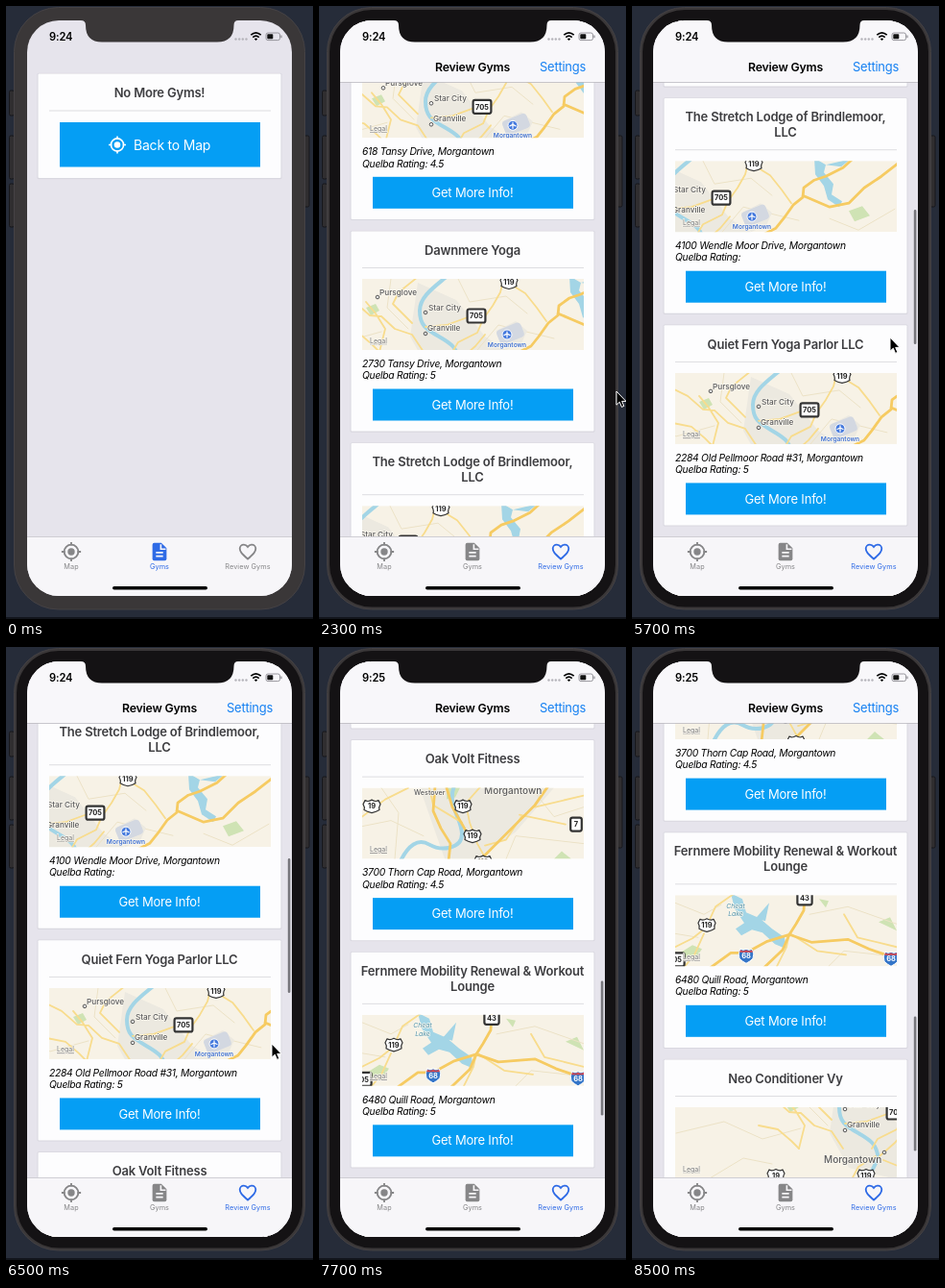
These frames come from a looping animation (320x638 px, 8.6 s). An HTML page:

```html
<!DOCTYPE html>
<html lang="en">
<head>
<meta charset="utf-8">
<title>Gym review</title>
<style>
  html, body { margin: 0; width: 100%; height: 100%; overflow: hidden; background: #262c39; }
  svg { display: block; }
  text { font-family: Inter, Roboto, sans-serif; letter-spacing: -.015em; }
  .map text { letter-spacing: 0; paint-order: stroke; stroke: #fbf8ef; stroke-width: 1.4px; stroke-linejoin: round; }
  .map .sign text { stroke: none; }
  .map path { fill: none; stroke-linecap: round; stroke-linejoin: round; }
  .lane { stroke: #ece2c6; stroke-width: 1; }
  .road { stroke: #f8dc8d; stroke-width: 1.8; }
  .main { stroke: #f6cb62; stroke-width: 2.8; }
  .river { stroke: #a3d5e6; stroke-width: 4; }
  .map .lake { fill: #a3d5e6; }
  .map .park { fill: #cfe3b4; }
  .map .town { fill: #ece9e0; }
  .address { font-style: italic; letter-spacing: -.027em; }
</style>
</head>
<body>
<svg id="stage" width="320" height="638" viewBox="0 0 320 638"></svg>
<script>
{
const LOOP = 8600, STEP = 100;
const WAKE = 1300, OPEN_REVIEWS = 2000, NEXT_MINUTE = 7500;
const BLUE = '#059ef4', ACTIVE = '#2f6be6', IDLE = '#868688';

const rect = (x, y, w, h, fill, more = '') =>
  `<rect x="${x}" y="${y}" width="${w}" height="${h}" fill="${fill}" ${more}/>`;
const text = (x, mid, size, str, fill = '#000', more = '') =>
  `<text x="${x}" y="${mid + size * .36}" font-size="${size}" fill="${fill}" ${more}>${str}</text>`;
const centered = (x, mid, size, str, fill, more = '') =>
  text(x, mid, size, str, fill, `text-anchor="middle" ${more}`);
const path = (cls, d) => `<path class="${cls}" d="${d}"/>`;
const bold = 'font-weight="600"';

// Icons on a 24 unit grid
const icons = {
  target: c => `<g fill="none" stroke="${c}" stroke-width="2"><circle cx="12" cy="12" r="8"/>
    <path d="M12 1v4M12 19v4M1 12h4M19 12h4"/></g><circle cx="12" cy="12" r="4" fill="${c}"/>`,
  page: c => `<path d="M14 2H6a2 2 0 0 0-2 2v16a2 2 0 0 0 2 2h12a2 2 0 0 0 2-2V8z" fill="${c}"/>
    <path d="M13.5 3.5V9H19M8 13h8M8 17h8" fill="none" stroke="#f7f6f9" stroke-width="1.8"/>`,
  heart: c => `<path d="M12 20.2C5.4 14.3 3 12 3 8.6 3 6 5 4 7.5 4c1.8 0 3.4.9 4.5 2.4C13.1 4.9 14.7 4 16.5 4
    19 4 21 6 21 8.6c0 3.4-2.4 5.7-9 11.6z" fill="none" stroke="${c}" stroke-width="2"/>`
};
const icon = (name, cx, cy, scale, color) =>
  `<g transform="translate(${cx - 12 * scale} ${cy - 12 * scale}) scale(${scale})">${icons[name](color)}</g>`;

// Road signs
const sign = (x, y, shape, label, fill = '#222') =>
  `<g class="sign" transform="translate(${x} ${y})">${shape}${centered(0, 0, 7.5, label, fill, 'font-weight="700"')}</g>`;
const route = (x, y, n) => sign(x, y,
  `<path d="M-7-6Q-4-4 0-6.5Q4-4 7-6L9-2Q7 1 8 4Q5 6 0 7Q-5 6-8 4Q-7 1-9-2Z" style="fill:#fff" stroke="#333" stroke-width="1.2"/>`, n);
const boxed = (x, y, n) => {
  const w = 8 + n.length * 3.6;
  return sign(x, y, rect(-w / 2, -7, w, 14, '#fff', 'rx="2" stroke="#333" stroke-width="2.2"'), n);
};
const interstate = (x, y, n) => sign(x, y,
  `<path d="M-6-7Q-3-5 0-7Q3-5 6-7Q9-2 7 3Q4 6 0 8Q-4 6-7 3Q-9-2-6-7Z" style="fill:#3475c8" stroke="#fff"/>
   <path d="M-6-6Q-3-4 0-6Q3-4 6-6L7-3.5H-7Z" style="fill:#d5484f"/>`, n, '#fff');
const place = (x, y, name, size = 8.2) => text(x, y, size, name, '#5a5a5c', 'font-weight="500"');
const dot = (x, y) => `<circle cx="${x}" cy="${y}" r="1.8" fill="#fff" stroke="#555"/>`;

const region = [
  path('town', 'M58 4L98 22L128 60L150 74L120 108L70 96L50 60Z'),
  path('park', 'M4 30l10 -4l4 7l-9 5zM252 52l14 -5l8 10l-16 6z'),
  path('lane', 'M-110 60L-60 48L-20 66L20 55M-80 110L-40 86L-10 92M100 0L112 24L150 18L172 36M120 74L142 48L200 62M232 60L262 72L300 50M30 0L26 30L48 52'),
  path('river', 'M90 -4C76 8 60 18 60 33S66 52 80 60S98 72 100 82S88 100 94 112'),
  path('lake', 'M216 -3L228 4L226 12L236 24L234 35L245 42L242 48L230 40L226 26L217 14ZM228 4L254 -2L244 6Z'),
  path('road', 'M-24 16L-8 24L8 38L20 39L34 52L52 58L64 76M18 76L24 52L14 36L4 24M148 -2L144 14L136 28L126 42L120 56L100 66L94 76M152 4L170 15L182 30L192 44M58 -2L38 14L32 26L44 38L52 46M110 40L88 48L66 50'),
  path('road', 'M-24 52L-4 56L10 68L18 76M98 84L80 95L72 110M102 84L118 70L128 58M106 88L126 96L140 108'),
  path('main', 'M160 78L176 70L184 60L194 46L204 38L205 28L216 20L228 16L246 7L256 -2M204 36L218 42L232 48L252 44L268 28L286 16L304 2'),
  path('town', 'M140 54L160 44L172 54L166 67L150 74Z'),
  rect(141, 49, 27, 16, '#d3d8e1', 'rx="4" transform="rotate(-22 154 57)"'),
  dot(16, 19), place(18, 14, 'Pursglove'),
  dot(66, 35), place(69, 30, 'Star City'),
  dot(66, 57), place(68, 51, 'Granville'),
  `<circle cx="151" cy="58" r="5" fill="#4479dd" stroke="#fff"/>
   <path d="M151 55v6M148 58.6l3-1.6l3 1.6" stroke="#fff" stroke-width="1.2"/>`,
  centered(151, 68.5, 6.6, 'Morgantown', '#3f70d2', bold),
  boxed(119, 38.5, '705'), route(153, 3.5, '119'),
  place(44, 87, 'Morgantown', 10), dot(107, 80), route(-6, 104, '19'), route(88, 104, '119')
].join('');

const south = [
  path('town', 'M60 0H200L160 46L120 74H86Z'),
  path('park', 'M88 0h14l-5 10l-9 2zM200 74l8-8l10 8z'),
  path('lane', 'M0 40L30 34L64 50M150 74L160 50L231 58M176 0L200 30L231 20M20 0L38 26L34 74'),
  path('river', 'M96 -2C88 18 104 32 104 48S82 66 70 59S48 60 40 76'),
  path('road', 'M0 30L24 12L48 0M70 0L74 18L104 36M124 -2L108 16L112 36L120 58L130 76M128 60L150 54L166 30M180 20L231 8M164 28L212 38'),
  path('main', 'M76 -2L74 24L82 42L92 58L90 76M88 0L94 20L110 48M122 76L144 54L166 32L180 18L194 -2'),
  place(54, 5, 'Westover', 7.2), place(127, 3, 'Morgantown', 10),
  route(10, 19, '19'), route(105, 19, '119'), route(115, 50, '119'), route(126, 77, '119'), boxed(223, 38, '7')
].join('');

const lakeside = [
  path('park', 'M2 62l16-10l10 4l-8 12zM150 4l10 2l-3 7zM212 28l12-5l7 14z'),
  path('lane', 'M0 8L30 20L48 10M140 20L180 12L231 30M160 74L176 58L231 64M0 40L24 44'),
  path('lake', 'M58 -2L70 4L74 18L88 24L101 35L114 44L116 56L104 51L91 39L80 36L69 42L63 35L72 29L62 14ZM84 24L98 8L94 27Z'),
  path('road', 'M0 54L18 45L32 34L42 12L62 -2M30 40L20 62L10 74M120 40L148 58L178 62M106 74L116 54L119 40M176 20L190 44L231 54'),
  path('main', 'M36 76L58 60L74 60L96 48L119 41L142 49L180 46L202 56L231 66M135 0L134 16L126 30L119 41L112 57L92 76'),
  centered(63, 11, 6.8, 'Cheat', '#4f91aa', 'font-style="italic"'),
  centered(63, 19.5, 6.8, 'Lake', '#4f91aa', 'font-style="italic"'),
  route(33, 31, '119'), boxed(135, 3, '43'), boxed(2, 67, '05'),
  interstate(74, 63, '68'), interstate(225, 66, '68')
].join('');

const map = (y, art, dx = 0, dy = 0) => `<svg class="map" x="45" y="${y}" width="231" height="74">
  ${rect(0, 0, 231, 74, '#f7f2e6')}<g transform="translate(${dx} ${dy})">${art}</g>
  ${text(8, 64, 7, 'Legal', '#77777a', 'text-decoration="underline"')}</svg>`;

const cardBox = (y, h) =>
  rect(32.5, y - .3, 255, h + 1, '#d9d8e0', 'rx="1.5"') + rect(33.5, y + .4, 253, h - .8, '#fdfdfe', 'rx="1"');
const divider = y => rect(45, y, 231, 1, '#dedee1');

const gyms = [
  { title: [''], address: '618 Tansy Drive', rating: '4.5', art: [region, 6, 3] },
  { title: ['Dawnmere Yoga'], address: '2730 Tansy Drive', rating: '5', art: [region] },
  { title: ['The Stretch Lodge of Brindlemoor,', 'LLC'], address: '4100 Wendle Moor Drive', rating: '', art: [region, -71, 0] },
  { title: ['Quiet Fern Yoga Parlor LLC'], address: '2284 Old Pellmoor Road #31', rating: '5', art: [region, 21, 0] },
  { title: ['Oak Volt Fitness'], address: '3700 Thorn Cap Road', rating: '4.5', art: [south] },
  { title: ['Fernmere Mobility Renewal &amp; Workout', 'Lounge'], address: '6480 Quill Road', rating: '5', art: [lakeside] },
  { title: ['Neo Conditioner Vy'], address: '5150 Larch Road', rating: '5', art: [region, 111, -33] }
];

let nextY = 92.3;
const cards = gyms.map(({ title, address, rating, art }) => {
  const y = nextY, body = y + (title.length - 1) * 15.5;
  nextY = body + 220.7;
  return cardBox(y, body - y + 209)
    + title.map((line, i) => centered(160, y + 20 + i * 16, 13, line, '#3d3d40', bold)).join('')
    + divider(body + 38) + map(body + 50, ...art)
    + text(45, body + 138, 10.3, `${address}, Morgantown`, '#000', 'class="address"')
    + text(45, body + 150.5, 10.3, `Quelba Rating: ${rating}`, '#000', 'class="address"')
    + rect(56, body + 164.5, 209, 33, BLUE)
    + centered(160, body + 181, 13, 'Get More Info!', '#fff');
}).join('');

const emptyScreen = rect(22, 15, 276, 600, '#e6e4ec') + cardBox(70, 109.5)
  + centered(160, 90, 13, 'No More Gyms!', '#3d3d40', bold) + divider(108.5)
  + rect(56, 121, 209, 46.5, BLUE) + icon('target', 116, 144.5, .82, '#fff')
  + text(133, 144.5, 14, 'Back to Map', '#fff');

const reviewScreen = rect(22, 15, 276, 600, '#e6e4ec') + `<g id="list">${cards}</g>`
  + rect(293.8, 0, 2.6, 140, '#77767c', 'id="bar" rx="1.3"')
  + rect(22, 15, 276, 64, '#f8f7fa') + rect(22, 79, 276, .8, '#bcbbc1')
  + centered(160, 63.5, 12.3, 'Review Gyms', '#000', bold)
  + text(230, 63.5, 12.9, 'Settings', '#1580f2');

const tabs = selected => [['Map', 'target', 68], ['Gyms', 'page', 160], ['Review Gyms', 'heart', 252]]
  .map(([label, glyph, x], i) => {
    const color = i === selected ? ACTIVE : IDLE;
    return icon(glyph, x, 568, .92, color) + centered(x, 583.2, 7.3, label, color, 'style="letter-spacing:.01em"');
  }).join('');

const statusBar = text(45, 32, 11.2, '9:24', '#000', `id="clock" ${bold}`)
  + [240, 243.7, 247.3, 251].map(x => `<circle cx="${x - .5}" cy="34.5" r="1.2" fill="#b5b4ba"/>`).join('')
  + `<g fill="none" stroke="#000" stroke-width="1.7"><path d="M255.3 30.2Q260.5 25.6 265.7 30.2M257.3 32.6Q260.5 29.8 263.7 32.6"/></g>
     <path d="M258.8 34.2Q260.5 32.8 262.2 34.2L260.5 36Z"/>`
  + rect(271, 28, 14.5, 7.6, 'none', 'rx="2" stroke="#8d8c92" stroke-width=".9"')
  + rect(272.3, 29.3, 6, 5, '#111', 'rx=".8"') + rect(286.4, 30.3, 1.2, 3, '#8d8c92', 'rx=".6"');

const sideButtons = [[3.5, 88, 26], [3.5, 135, 45], [3.5, 185, 45], [311, 135, 74]]
  .map(([x, y, h]) => rect(x, y, 5, h, '#302e30', 'rx="1.5" stroke="#17171b"')).join('');

document.getElementById('stage').innerHTML = `
  <defs><clipPath id="glass"><rect x="22" y="15" width="276" height="599" rx="33"/></clipPath></defs>
  ${rect(0, 0, 320, 638, '#262c39')}${rect(0, 636, 320, 2, '#12151c')}${sideButtons}
  ${rect(8.5, 1.5, 303, 626.5, '#3a3738', 'rx="46" stroke="#454245"')}
  ${rect(11, 4, 298, 621.5, '#141214', 'rx="44" id="bezel"')}
  <g clip-path="url(#glass)">
    <g id="empty">${emptyScreen}</g><g id="reviews">${reviewScreen}</g>
    ${rect(22, 552, 276, 63, '#f7f6f9')}${rect(22, 552, 276, .8, '#c6c5cb')}
    <g id="gymsTab">${tabs(1)}</g><g id="reviewsTab">${tabs(2)}</g>
    ${rect(111, 604, 99, 3.6, '#000', 'rx="1.8"')}${statusBar}
  </g>
  <path id="notch" d="M78 14H242V15Q237.5 15 237.5 20Q237.5 37.5 220 37.5H100Q83 37.5 83 20Q83 15 78 15Z"/>
  <path id="cursor" d="M0 0V14.2L3.3 11.2L5.5 16.4L7.9 15.4L5.7 10.4H10Z" fill="#000" stroke="#fff" stroke-width="1"/>`;

const el = id => document.getElementById(id);
const show = (id, on) => el(id).setAttribute('visibility', on ? 'visible' : 'hidden');
const move = (id, x, y) => el(id).setAttribute('transform', `translate(${x} ${y})`);

// Each flick: a drag, then a decaying coast towards the end position
const flicks = [
  { start: 4800, release: 5000, from: 79, lift: 220.6, end: 467.6, tau: 330, power: 1 },
  { start: 6950, release: 7100, from: 467.3, lift: 532, end: 1050, tau: 500, power: 2 }
];
function scrollAt(t) {
  const f = flicks.filter(f => t >= f.start).pop();
  if (!f) return 79;
  if (t < f.release) return f.from + (f.lift - f.from) * ((t - f.start) / (f.release - f.start)) ** f.power;
  return f.end - (f.end - f.lift) * Math.exp((f.release - t) / f.tau);
}

const pointer = [
  [300, 294, 340], [900, 257, 577], [2000, 257, 572], [2300, 310, 401], [2500, 322, 380],
  [2900, 322, 350], [3500, 272, 287], [4600, 272, 287], [4800, 270, 487], [5000, 269, 345],
  [5700, 269, 345], [6500, 277, 413], [6950, 280, 440], [7100, 280, 375], [7300, 288, 370]
];
function pointerAt(t) {
  const i = pointer.findIndex(p => p[0] > t);
  if (i < 1) return null;
  const [t0, x0, y0] = pointer[i - 1], [t1, x1, y1] = pointer[i];
  const u = (t - t0) / (t1 - t0), e = u * u * (3 - 2 * u);
  return [x0 + (x1 - x0) * e, y0 + (y1 - y0) * e];
}

function draw(t) {
  const reviewing = t >= OPEN_REVIEWS, awake = t >= WAKE, scroll = scrollAt(t), at = pointerAt(t);
  show('empty', !reviewing);
  show('gymsTab', !reviewing);
  show('reviews', reviewing);
  show('reviewsTab', reviewing);
  show('bezel', awake);
  el('notch').setAttribute('fill', awake ? '#141214' : '#3a3738');
  el('clock').textContent = t < NEXT_MINUTE ? '9:24' : '9:25';
  move('list', 0, -scroll);
  move('bar', 0, 82 + scroll * .297);
  el('bar').setAttribute('opacity', t >= flicks[0].start ? 1 : 0);
  show('cursor', at);
  if (at) move('cursor', ...at);
}

const begin = performance.now();
function tick() {
  const t = Math.max(0, performance.now() - begin) % LOOP;
  draw(Math.floor(t / STEP) * STEP);
  requestAnimationFrame(tick);
}
tick();
}
</script>
</body>
</html>
```
